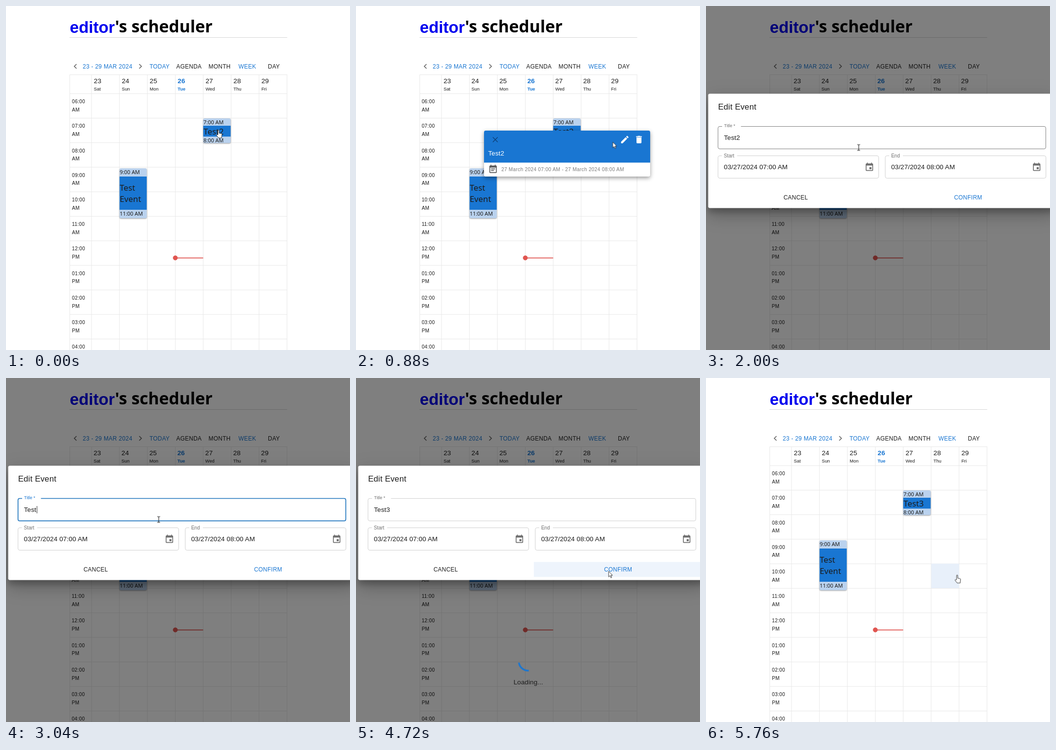
Write an HTML page that moves like this. It is 704 px wide and 704 px high and loops after 5.84 s.

```html
<!DOCTYPE html>
<html lang="en">
<head>
<meta charset="utf-8">
<title>Scheduler</title>
<style>
html, body { margin: 0; width: 100%; height: 100%; overflow: hidden; background: #fff; }
svg { display: block; width: 704px; height: 704px; }
text { font-family: "Liberation Sans", Arial, sans-serif; fill: #1c1c1c; white-space: pre; }
.noto { font-family: "Noto Sans", "Open Sans", sans-serif; }
.h1 { font-size: 33.9px; font-weight: 700; fill: #000; }
.user { font-size: 33.2px; font-weight: 700; fill: #00e; }
.btn { font-size: 11.85px; letter-spacing: .34px; }
.body { font-size: 13.5px; letter-spacing: .12px; }
.cap { font-size: 10.13px; letter-spacing: .338px; }
.day { font-size: 9.3px; }
.label { font-size: 10.1px; fill: #707070; }
.h6 { font-size: 16.9px; letter-spacing: .13px; }
.time { font-size: 10.9px; }
.event { font-size: 16.8px; }
.blue { fill: #1976d2; }
.bold { font-weight: 700; }
.mid { text-anchor: middle; }
.line { fill: none; stroke: #e8e8e8; }
.box { fill: none; stroke: #d0d0d0; }
.card { filter: drop-shadow(0 1px 1px rgba(0,0,0,.4)); }

/* One clock for everything; values hold unless a segment says otherwise. */
.a { animation: 5840ms step-end infinite; }
.shift { animation-name: shift; }
.popup { animation-name: popup; transform-origin: 432px 302px; filter: drop-shadow(0 3px 4px rgba(0,0,0,.4)); }
.ripple { animation-name: ripple; }
.veil { animation-name: veil; }
.dialog {
  animation-name: veil;
  filter: drop-shadow(0 9px 6px rgba(0,0,0,.2)) drop-shadow(0 16px 16px rgba(0,0,0,.14)) drop-shadow(0 6px 18px rgba(0,0,0,.12));
}
.title-box { animation-name: titleBox; }
.title-label { animation-name: titleLabel; font-size: 9px; }
.typed2 { animation-name: typed2; }
.typed { animation-name: typed; }
.typed3 { animation-name: typed3; }
.caret { animation-name: caret; }
.hover { animation-name: hover; }
.load { animation-name: load; }
.spin { animation-name: spin; animation-timing-function: linear; transform-origin: 352.5px 579.5px; }
.arc { animation-name: arc; fill: none; stroke: #1976d2; stroke-width: 3.4; }
.before { animation-name: before; }
.after { animation-name: after; }
.cell { animation-name: cell; }
.cursor { animation-name: move; }
.hand { animation-name: hand; }
.arrow { animation-name: arrow; }
.beam { animation-name: beam; }

@keyframes shift {
  0%, 86.3% { transform: none; }
  6.84% { transform: translateX(-.6px); }
}
@keyframes popup {
  0% { opacity: 0; transform: scale(.8); }
  5.47% { opacity: .3; transform: scale(.85); }
  6.84% { opacity: .8; transform: scale(.97); }
  8.21% { opacity: 1; transform: none; }
  24.65% { opacity: .86; transform: none; }
  26.02% { opacity: .3; transform: none; }
  27.39%, 100% { opacity: 0; transform: none; }
}
@keyframes ripple { 0%, 27.39% { opacity: 0; } 19.17% { opacity: .15; } 23.28% { opacity: .3; } }
@keyframes veil {
  0%, 87.67%, 100% { opacity: 0; }
  24.65% { opacity: .18; }
  26.02% { opacity: .75; }
  27.39% { opacity: .97; }
  28.76% { opacity: 1; }
  84.93% { opacity: .6; }
  86.3% { opacity: .12; }
}
@keyframes titleBox {
  0%, 75.34%, 100% { stroke: #d0d0d0; stroke-width: 1px; }
  28.76% { stroke: #808080; stroke-width: 1px; }
  38.35% { stroke: #1f75bd; stroke-width: 1.7px; }
}
@keyframes titleLabel { 0%, 75.34%, 100% { fill: #707070; } 38.35% { fill: #1976d2; } }
@keyframes typed2 { 0% { opacity: 1; } 49.31%, 100% { opacity: 0; } }
@keyframes typed { 0%, 53.42%, 100% { opacity: 0; } 49.31% { opacity: 1; } }
@keyframes typed3 { 0% { opacity: 0; } 53.42%, 100% { opacity: 1; } }
@keyframes caret {
  0%, 46.57%, 61.64%, 100% { opacity: 0; transform: none; }
  38.35%, 53.42% { opacity: 1; transform: none; }
  49.31% { opacity: 1; transform: translateX(-7.6px); }
}
@keyframes hover { 0% { fill: #fff; } 65.75% { fill: #f5f8fd; } 75.34%, 100% { fill: #eef4fc; } }
@keyframes load { 0%, 83.56%, 100% { opacity: 0; } 76.71% { opacity: 1; } }
@keyframes spin { 0%, 76.37% { transform: none; } 88.35%, 100% { transform: rotate(200deg); } }
@keyframes arc {
  0% { stroke-dasharray: 1 200; stroke-dashoffset: 0; }
  76.37% { stroke-dasharray: 1 200; stroke-dashoffset: 0; animation-timing-function: ease-in-out; }
  88.35%, 100% { stroke-dasharray: 100 200; stroke-dashoffset: -15; }
}
@keyframes before { 0% { opacity: 1; } 83.56%, 100% { opacity: 0; } }
@keyframes after { 0% { opacity: 0; } 83.56%, 100% { opacity: 1; } }
@keyframes cell { 0% { opacity: 0; } 86.3%, 100% { opacity: 1; } }
@keyframes move {
  0% { transform: translate(435px, 254px); }
  9.58% { transform: translate(435px, 254px); animation-timing-function: steps(4); }
  15.06% { transform: translate(525.5px, 278.5px); animation-timing-function: steps(3); }
  19.17% { transform: translate(549px, 270px); }
  24.65% { transform: translate(476px, 301.5px); animation-timing-function: steps(7); }
  34.24% { transform: translate(312.5px, 289.5px); }
  57.53% { transform: translate(312.5px, 289.5px); animation-timing-function: steps(6); }
  65.75% { transform: translate(534px, 388px); }
  75.34% { transform: translate(534px, 388px); animation-timing-function: steps(4); }
  80.82% { transform: translate(517px, 395.5px); }
  89.04% { transform: translate(517px, 395.5px); animation-timing-function: steps(3); }
  93.15%, 100% { transform: translate(514px, 403.5px); }
}
@keyframes hand {
  0%, 19.17%, 65.75%, 87.67%, 100% { opacity: 1; }
  6.84%, 24.65%, 76.71% { opacity: 0; }
}
@keyframes arrow {
  0%, 19.17%, 28.76%, 65.75%, 87.67%, 100% { opacity: 0; }
  6.84%, 24.65%, 60.27%, 76.71% { opacity: 1; }
}
@keyframes beam { 0%, 60.27%, 100% { opacity: 0; } 28.76% { opacity: 1; } }
</style>
</head>
<body>
<svg viewBox="0 0 704 704">
  <defs>
    <path id="calendar" fill="#6f6f6f" d="M17 12h-5v5h5v-5zM16 1v2H8V1H6v2H5c-1.1 0-2 .9-2 2v14c0 1.1.9 2 2 2h14c1.1 0 2-.9 2-2V5c0-1.1-.9-2-2-2h-1V1h-2zm3 18H5V8h14v11z"/>
  </defs>

  <text class="user" x="130.5" y="54.5">editor</text>
  <text class="h1 noto" x="223" y="54.4">'s scheduler</text>
  <path fill="none" stroke="#d6d6d6" stroke-width="1.2" d="M130 64.5H575.5"/>
  <path fill="none" stroke="#666" stroke-width="1.7" d="M144.3 119l-4.5 4.5 4.5 4.5M272.7 119l4.5 4.5-4.5 4.5"/>
  <g class="btn">
    <text class="blue" x="157" y="127.5">23 - 29 MAR 2024</text>
    <text class="blue" x="293.7" y="127.5">TODAY</text>
    <text x="348.5" y="127.5">AGENDA</text>
    <text x="414.5" y="127.5">MONTH</text>
    <text class="blue" x="475.7" y="127.5">WEEK</text>
    <text x="536" y="127.5">DAY</text>
  </g>
  <path id="grid" class="line"/>
  <rect class="a cell" x="461" y="380" width="57" height="50" fill="#e8f0fa"/>
  <g id="labels" class="a shift"></g>

  <g fill="#e05550" stroke="#e05550">
    <circle cx="346.5" cy="515.5" r="4.5"/>
    <path stroke-width="1.7" d="M346 515.7H403.5"/>
  </g>
  <g class="card">
    <rect x="403.7" y="230" width="56" height="50.5" rx="3" fill="#bad2ee"/>
    <path fill="#1976d2" d="M403.7 245h56v22.3h-56z"/>
    <rect x="232.4" y="332.3" width="55.6" height="102" rx="3" fill="#bad2ee"/>
    <path fill="#1976d2" d="M232.4 349H288v68h-55.6z"/>
  </g>
  <text class="time noto" x="404" y="241.5">7:00 AM</text>
  <text class="time noto" x="404" y="279">8:00 AM</text>
  <text class="event noto a before" x="404.3" y="262.7">Test2</text>
  <text class="event noto a after" x="404.3" y="262.7">Test3</text>
  <text class="time noto" x="232.7" y="344">9:00 AM</text>
  <text class="time noto" x="232.7" y="428.5">11:00 AM</text>
  <text class="event noto" x="232.7" y="378.2">Test</text>
  <text class="event noto" x="232.7" y="400.7">Event</text>

  <g class="a popup">
    <rect x="262" y="255" width="340" height="94" rx="3.4" fill="#fff"/>
    <path fill="#1976d2" d="M262 320.5V258.4q0-3.4 3.4-3.4H598.6q3.4 0 3.4 3.4V320.5z"/>
    <path fill="none" stroke="#0f3f73" stroke-width="1.2" d="M280 268.5l10 10m0-10l-10 10"/>
    <circle class="a ripple" cx="549.5" cy="273.5" r="10" fill="#fff"/>
    <path fill="#fff" transform="translate(540 263.2) scale(.844)" d="M3 17.25V21h3.75L17.81 9.94l-3.75-3.75zM20.71 7.04c.39-.39.39-1.02 0-1.41l-2.34-2.34c-.39-.39-1.02-.39-1.41 0l-1.83 1.83 3.75 3.75z"/>
    <path fill="#fff" transform="translate(569 263.2) scale(.844)" d="M6 19c0 1.1.9 2 2 2h8c1.1 0 2-.9 2-2V7H6zM19 4h-3.5l-1-1h-5l-1 1H5v2h14z"/>
    <text class="body" x="270.5" y="306" style="fill:#fff">Test2</text>
    <path fill="#5c5c5c" transform="translate(270.4 324) scale(.844)" d="M17 10H7v2h10zm2-7h-1V1h-2v2H8V1H6v2H5c-1.1 0-2 .9-2 2v14c0 1.1.9 2 2 2h14c1.1 0 2-.9 2-2V5c0-1.1-.9-2-2-2zm0 16H5V8h14zm-5-5H7v2h7z"/>
    <text class="cap" x="297.5" y="337.7" style="fill:#7c7c7c">27 March 2024 07:00 AM - 27 March 2024 08:00 AM</text>
  </g>

  <g class="a veil"><rect width="704" height="704" opacity=".5"/></g>

  <g class="a load">
    <g class="a spin"><circle class="a arc" cx="352.5" cy="579.5" r="19.4" pathLength="127"/></g>
    <text class="body mid" x="352.7" y="627">Loading...</text>
  </g>

  <g class="a dialog">
    <rect x="4.5" y="179.5" width="711" height="234" rx="3.4" fill="#fff"/>
    <text class="h6" x="24.7" y="211.8">Edit Event</text>
    <path class="box a title-box" d="M33 246.5H28q-3.4 0-3.4 3.4V289q0 3.4 3.4 3.4H692q3.4 0 3.4-3.4V249.9q0-3.4-3.4-3.4H71.5"/>
    <text class="label a title-label" x="37" y="248.3">Title *</text>
    <text class="body a typed2" x="36.7" y="274">Test2</text>
    <text class="body a typed" x="36.7" y="274">Test</text>
    <text class="body a typed3" x="36.7" y="274">Test3</text>
    <path class="a caret" stroke="#222" d="M71 262v15"/>
    <g id="dates"></g>
    <rect class="a hover" x="364" y="376.5" width="340" height="30.5"/>
    <text class="btn mid" x="183.7" y="395.7">CANCEL</text>
    <text class="btn mid blue" x="536.5" y="395.7">CONFIRM</text>
  </g>

  <g class="a cursor" fill="#fff" stroke="#222" stroke-width=".9" stroke-linejoin="round">
    <path class="a hand" d="M-1.2 9.5V1a1.2 1.2 0 0 1 2.4 0V6.2l4.6.9q1.4.4 1.3 1.9l-.8 4.2V16H0l-4.3-5.4c-.7-1 .6-2 1.6-1.2z"/>
    <path class="a arrow" d="M0 0V11.5L2.7 9 4.6 13.2 6.4 12.4 4.6 8.3H8z"/>
    <path class="a beam" fill="none" stroke="#111" stroke-width="1.1" d="M-3-6q3 0 3 1V5q0 1-3 1M3-6q-3 0-3 1M3 6q-3 0-3-1"/>
  </g>
</svg>
<script>
const $ = id => document.getElementById(id);
const text = (cls, x, y, s) => `<text class="${cls}" x="${x}" y="${y}">${s}</text>`;
const colX = i => 175 + 57.15 * i;
const rowY = i => 179.3 + 50.22 * i;

let lines = "M130 140.7H575.5M130.5 140.7V704";
for (let i = 0; i < 8; i++) lines += `M${colX(i)} 140.7V704`;
for (let i = 0; i < 11; i++) lines += `M130 ${rowY(i)}H575.5`;
$("grid").setAttribute("d", lines);

let labels = "";
["Sat", "Sun", "Mon", "Tue", "Wed", "Thu", "Fri"].forEach((day, i) => {
  const x = colX(i) + 4.8, today = day === "Tue" ? " blue bold" : "";
  labels += text("body" + today, x, 157.5, 23 + i) + text("day" + today, x, 172.5, day);
});
for (let i = 0; i < 11; i++) {
  const hour = 6 + i, y = rowY(i) + 19.8;
  const clock = String(hour > 12 ? hour - 12 : hour).padStart(2, "0") + ":00";
  labels += text("cap", 135, y, clock) + text("cap", 135, y + 16.7, hour < 12 ? "AM" : "PM");
}
$("labels").innerHTML = labels;

const dateField = (x, name, gap, value) =>
  `<path class="box" d="M${x + 8} 306.5h-4.6q-3.4 0-3.4 3.4V349q0 3.4 3.4 3.4h322q3.4 0 3.4-3.4V309.9q0-3.4-3.4-3.4H${x + gap}"/>` +
  text("label", x + 12, 309.7, name) + text("body", x + 12, 334, value) +
  `<use href="#calendar" transform="translate(${x + 299.7} 319.7) scale(.844)"/>`;
$("dates").innerHTML =
  dateField(24.6, "Start", 39, "03/27/2024 07:00 AM") +
  dateField(366.9, "End", 36, "03/27/2024 08:00 AM");
</script>
</body>
</html>
```
